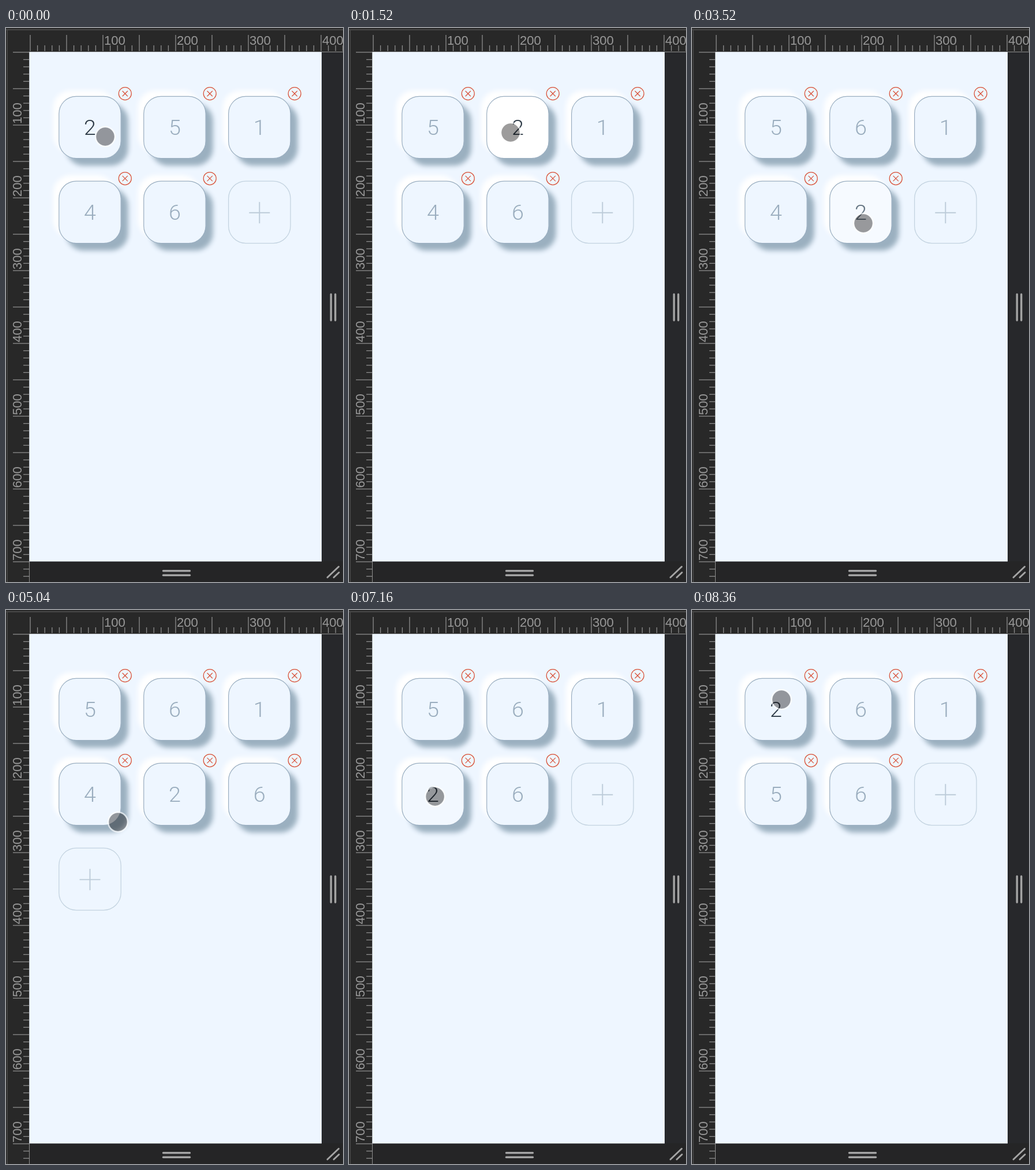
An HTML page with a canvas that plays this animation: 584x959 px, repeating every 9.34 s.

```html
<!DOCTYPE html>
<html lang="en">
<head>
<meta charset="utf-8">
<title>Sortable tiles</title>
<style>
html, body { margin: 0; width: 100%; height: 100%; overflow: hidden; background: #27282b; }
canvas { display: block; }
</style>
</head>
<body>
<canvas id="stage" width="584" height="959"></canvas>
<script>
const ctx = document.getElementById('stage').getContext('2d');
const LOOP = 9340;
const UNIT = 1.26;
const SIZE = 107.4;
const PITCH = 146.9;
const LEFT = 91.8, TOP = 118.3;
const FADE = 360;
const PAGE = [238, 246, 255];
const WHITE = [255, 255, 255];
const GRAY = [154, 173, 190];
const INK = [45, 58, 70];

// Pointer gestures; a drag carries its tile until the release, a tap edits the list
const home = { x: 172, y: 188 };
const gestures = [
  { from: 40, to: 160, x: 161, y: 181 },
  { from: 480, to: 1120, x: 280, y: 181, release: 2240 },
  { from: 1520, to: 1960, x: 326, y: 141 },
  { from: 2400, to: 3120, x: 297, y: 338, release: 3340 },
  { from: 3560, to: 4400, x: 416, y: 340, tapAt: 4640, edit: list => [...list, '6'] },
  { from: 4720, to: 5040, x: 194, y: 367 },
  { from: 5040, to: 5640, x: 209, y: 262, tapAt: 5920, edit: list => list.filter((_, i) => i !== 3) },
  { from: 6240, to: 6680, x: 149, y: 326 },
  { from: 7120, to: 7640, x: 155, y: 155, release: 8000 }
];
const drags = gestures.filter(g => g.release);

const lerp = (a, b, u) => a + (b - a) * u;
const ramp = (t, start, length) => Math.min(1, Math.max(0, (t - start) / length));
const smooth = u => u * u * (3 - 2 * u);
const mix = (a, b, u) => `rgb(${a.map((v, i) => Math.round(lerp(v, b[i], u)))})`;

const slot = i => [LEFT + PITCH * (i % 3), TOP + PITCH * Math.floor(i / 3)];
const cell = (v, origin) => Math.round((v - origin - SIZE / 2) / PITCH);
const slotAt = p => cell(p.x, LEFT) + 3 * cell(p.y, TOP);

function pointerAt(t) {
  return gestures.reduce((p, g) => {
    const u = smooth(ramp(t, g.from, g.to - g.from));
    return { x: lerp(p.x, g.x, u), y: lerp(p.y, g.y, u) };
  }, home);
}

function listAt(t) {
  let list = [...'25146'];
  for (const g of gestures) {
    if (g.release && t > g.from) {
      const a = slotAt(pointerAt(g.from));
      const b = slotAt(pointerAt(Math.min(t, g.to)));
      [list[a], list[b]] = [list[b], list[a]];
    }
    if (g.edit && t >= g.tapAt) list = g.edit(list);
  }
  return list;
}

function box(x, y, w, h, color) {
  ctx.fillStyle = color;
  ctx.fillRect(x, y, w, h);
}

function line(x1, y1, x2, y2, color, width) {
  ctx.strokeStyle = color;
  ctx.lineWidth = width;
  ctx.beginPath();
  ctx.moveTo(x1, y1);
  ctx.lineTo(x2, y2);
  ctx.stroke();
}

function circle(x, y, r) {
  ctx.beginPath();
  ctx.arc(x, y, r, 0, 2 * Math.PI);
}

function tilePath(x, y) {
  ctx.beginPath();
  ctx.roundRect(x, y, SIZE, SIZE, 30);
}

function label(text, x, y, angle) {
  ctx.save();
  ctx.translate(x, y);
  ctx.rotate(angle);
  ctx.font = '22px "Liberation Sans", Arial, sans-serif';
  ctx.textAlign = 'left';
  ctx.fillStyle = '#989898';
  ctx.fillText(text, 0, 0);
  ctx.restore();
}

function drawFrame() {
  const tick = '#8d8d8d';
  box(0, 0, 584, 959, '#27282b');
  box(0, 0, 584, 41, '#282828');
  box(0, 0, 40, 959, '#282828');
  box(41, 923, 543, 36, '#252526');
  box(0, 2, 584, 2, '#484848');
  box(1.5, 2, 1.5, 957, '#484848');
  box(40, 41, 544, 1, tick);
  box(40, 41, 1, 918, tick);
  for (let n = 0; n <= 72; n++) {
    const p = 42 + n * 10 * UNIT;
    const start = n % 5 ? 30 : 12;
    line(p, start, p, 40, tick, 1.3);
    line(start, p, 40, p, tick, 1.3);
    if (n && n % 10 === 0) {
      label(n * 10, p + 2, 29, 0);
      label(n * 10, 27, p - 2, -Math.PI / 2);
    }
  }
  box(40.5, 41.5, 506.5, 882, mix(PAGE, PAGE, 0));
}

function drawHandles() {
  const color = '#a4a4a4';
  ctx.lineCap = 'round';
  for (const d of [0, 7.5]) {
    line(563.2 + d, 461, 563.2 + d, 506, color, 3.4);
    line(272.5, 939.7 + d, 318.5, 939.7 + d, color, 3.4);
  }
  line(557, 951, 576.5, 932.5, color, 3);
  line(568, 951, 577, 942.5, color, 3);
  ctx.lineCap = 'butt';
}

function drawTile(i, digit, fill, ink) {
  const [x, y] = slot(i);
  ctx.save();
  ctx.fillStyle = fill;
  ctx.shadowBlur = 8.5;
  for (const [offset, color] of [[10, '#9bb0c0'], [-8, '#ffffff']]) {
    ctx.shadowColor = color;
    ctx.shadowOffsetX = ctx.shadowOffsetY = offset * UNIT;
    tilePath(x, y);
    ctx.fill();
  }
  ctx.restore();
  ctx.strokeStyle = '#9aaec0';
  ctx.lineWidth = 1.2;
  tilePath(x, y);
  ctx.stroke();
  ctx.font = '300 37.8px Roboto, sans-serif';
  ctx.textAlign = 'center';
  ctx.fillStyle = ink;
  ctx.fillText(digit, x + SIZE / 2, y + 66.7);
}

function drawRemove(i) {
  const [x, y] = slot(i);
  const cx = x + 114.5, cy = y - 4.7, r = 4.6, red = '#d9543b';
  ctx.strokeStyle = red;
  ctx.lineWidth = 1.25;
  circle(cx, cy, 11);
  ctx.stroke();
  line(cx - r, cy - r, cx + r, cy + r, red, 1.25);
  line(cx - r, cy + r, cx + r, cy - r, red, 1.25);
}

function drawPlus(i) {
  const [x, y] = slot(i);
  const cx = x + SIZE / 2, cy = y + 54.5;
  ctx.strokeStyle = '#c2d2df';
  ctx.lineWidth = 1.25;
  tilePath(x, y);
  ctx.stroke();
  line(cx - 18, cy, cx + 18, cy, '#bccbd8', 1.9);
  line(cx, cy - 18.5, cx, cy + 18.5, '#bccbd8', 1.9);
}

function drawPress(i) {
  const [x, y] = slot(i);
  const tint = 'rgba(51, 181, 229, 0.37)';
  box(x, y, SIZE, SIZE, tint);
  box(x + 78, y - 36, 67.6, 63, tint);
}

function drawPointer({ x, y }) {
  circle(x, y, 16);
  ctx.fillStyle = 'rgba(4, 0, 0, 0.39)';
  ctx.fill();
  circle(x, y, 17);
  ctx.strokeStyle = 'rgba(255, 255, 255, 0.6)';
  ctx.lineWidth = 2.6;
  ctx.stroke();
}

function draw(t) {
  const list = listAt(t);
  const glow = Math.max(...drags.map(d => ramp(t, d.from, 160) - ramp(t, d.release, FADE)));
  const shade = 1 - ramp(t, 3340, FADE) + ramp(t, 6560, FADE);
  drawFrame();
  list.forEach((digit, i) => {
    const active = digit === '2';
    drawTile(i, digit, mix(PAGE, WHITE, active ? glow : 0), mix(GRAY, INK, active ? shade : 0));
  });
  list.forEach((_, i) => drawRemove(i));
  drawPlus(list.length);
  for (const d of drags) {
    if (t >= d.from - 160 && t < d.from) drawPress(slotAt(pointerAt(t)));
  }
  drawPointer(pointerAt(t));
  drawHandles();
}

const begin = performance.now();
function tick() {
  draw((performance.now() - begin) % LOOP);
  requestAnimationFrame(tick);
}
tick();
</script>
</body>
</html>
```
